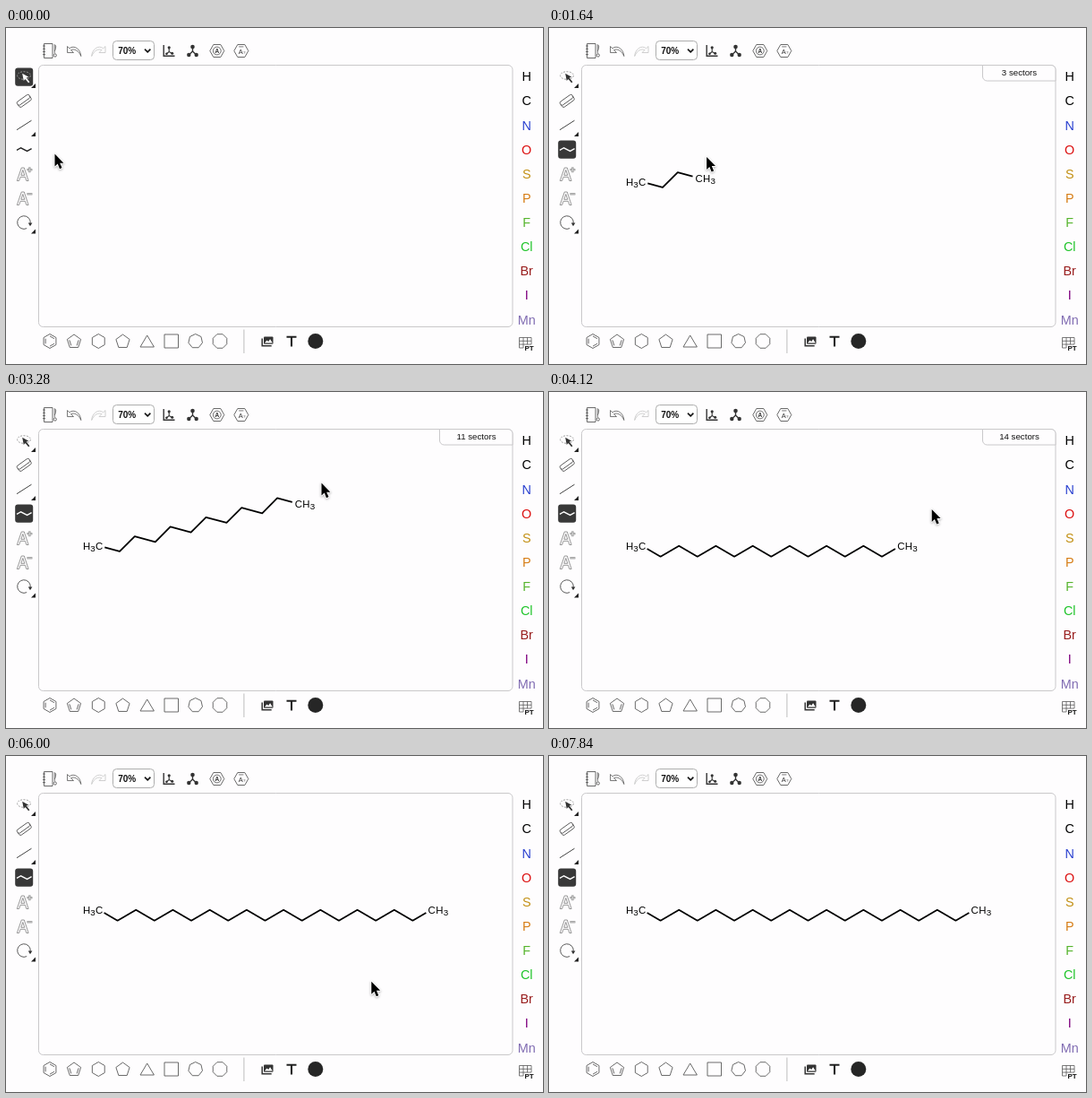
Animation of 600x375 px, one loop 7880 ms. Source, as an HTML page with a canvas:

```html
<!DOCTYPE html>
<html lang="en">
<head>
<meta charset="utf-8">
<title>Chain tool</title>
<style>
html, body { margin: 0; width: 100%; height: 100%; overflow: hidden; background: #fefdfe; }
canvas { display: block; width: 600px; height: 375px; }
</style>
</head>
<body>
<canvas id="stage"></canvas>
<script>
const W = 600, H = 375, LOOP = 7880, STEP = 40;
const BG = '#fefdfe', DARK = '#333', INK = '#5a5a5a', EDGE = '#c9c8ca';
const FONT = '"Liberation Sans", Arial, sans-serif';
const canvas = document.getElementById('stage');
const ctx = canvas.getContext('2d');
const dpr = window.devicePixelRatio || 1;
canvas.width = W * dpr;
canvas.height = H * dpr;

// ---- helpers ----
function stroke(d, color = INK, width = 0.9) {
  ctx.strokeStyle = color;
  ctx.lineWidth = width;
  ctx.stroke(new Path2D(d));
}
function fill(d, color = DARK) {
  ctx.fillStyle = color;
  ctx.fill(new Path2D(d));
}
function dot(x, y, r, color = DARK) {
  ctx.beginPath();
  ctx.arc(x, y, r, 0, Math.PI * 2);
  ctx.fillStyle = color;
  ctx.fill();
}
function ring(x, y, r, color = INK, width = 0.9) {
  ctx.beginPath();
  ctx.arc(x, y, r, 0, Math.PI * 2);
  ctx.strokeStyle = color;
  ctx.lineWidth = width;
  ctx.stroke();
}
function box(x, y, w, h, r, line, back) {
  ctx.beginPath();
  ctx.roundRect(x, y, w, h, r);
  if (back) { ctx.fillStyle = back; ctx.fill(); }
  if (line) { ctx.strokeStyle = line; ctx.lineWidth = 1; ctx.stroke(); }
}
function text(s, x, y, size, color = '#000', align = 'center', weight = '') {
  ctx.font = `${weight} ${size}px ${FONT}`;
  ctx.fillStyle = color;
  ctx.textAlign = align;
  ctx.fillText(s, x, y);
}
function at(x, y, draw) {
  ctx.save();
  ctx.translate(x, y);
  draw();
  ctx.restore();
}
function corners(n, r, turn = 0) {
  return Array.from({ length: n }, (_, i) => {
    const a = -Math.PI / 2 + turn + i * 2 * Math.PI / n;
    return [r * Math.cos(a), r * Math.sin(a)];
  });
}
function polygon(n, r, turn) {
  stroke('M' + corners(n, r, turn).map(p => p.join()).join('L') + 'Z');
}
function innerBonds(n, r, sides) {
  const p = corners(n, r);
  for (const i of sides) stroke(`M${p[i]}L${p[(i + 1) % n]}`);
}

// ---- toolbars ----
function topBar() {
  stroke('M42.5 17.5h9.5v16h-9.5zM41 20h3M41 23.2h3M41 26.4h3M41 29.6h3');
  stroke('M54.3 18.5q2.2 1 1.2 4.2l-1.2 3.3zM54.3 26v2.5', INK, 0.8);
  ring(54.8, 30.5, 1.6);
  const undo = 'M-7.5 -5.5v7h7l-3 -3C0 -3 5 -1.5 7.8 5.5C7.5 -2.5 0 -7.5 -5.2 -3.2z';
  at(76, 26, () => stroke(undo, INK, 0.8));
  at(103.5, 26, () => { ctx.scale(-1, 1); stroke(undo, '#c4c4c4', 0.8); });

  box(119.5, 14.5, 46, 21, 4, '#adadad', '#fff');
  text('70%', 125.2, 28.7, 10, '#111', 'left', 'bold');
  stroke('M155 23.6l3.2 3.2 3.2 -3.2', '#111', 1.6);

  stroke('M176.2 19v12.3h12.3', DARK, 1.4);
  stroke('M182.2 22v4.5l-3 2.5M182.2 26.5l3.5 2', DARK, 1.1);
  dot(182.2, 21.8, 1.6); dot(185.7, 28.2, 1.5); dot(179.4, 28.7, 1.3);
  stroke('M208.5 21v5l-4.2 4M208.5 26l4.2 4', DARK, 1.4);
  dot(208.5, 21, 2.3); dot(204.3, 30, 2.2); dot(212.7, 30, 2.2);

  const hex = 'M-8 0L-4 -7H4L8 0L4 7H-4Z';
  at(235.8, 25.5, () => {
    stroke(hex);
    ring(0, 0, 4.4);
    text('A', 0, 2.4, 6.5, DARK, 'center', 'bold');
  });
  at(262.8, 25.5, () => {
    stroke(hex);
    text('A', -0.5, 3, 7.5, DARK);
    stroke('M-2.6 -4.6h5.2', INK, 0.8);
    text('?', 3.6, 3.2, 4, DARK);
  });
}

function flyout(y) { fill(`M33 ${y - 5}v5h-5z`, '#222'); }

function letterIcon(y, sign) {
  const mark = 'M3.4 -4.2h6' + (sign > 0 ? 'M6.4 -7.2v6' : '');
  at(20, y, () => {
    stroke('M-7.7 8L-2.7 -6.5H0.3L5.1 8H2.8L1.4 3.8H-3.9L-5.4 8ZM-3.2 1.8L-1.2 -4L0.8 1.8Z', '#777', 0.75);
    stroke(mark, '#777', 2);
    stroke(mark, BG, 0.6);
  });
}

function leftBar(chainOn) {
  box(10.2, chainOn ? 125.5 : 44.5, 20, 20.3, 3, null, '#383838');

  ctx.setLineDash([2, 1.4]);
  ctx.beginPath();
  ctx.ellipse(20, 53, 7.4, 4.3, 0, 0, Math.PI * 2);
  ctx.strokeStyle = chainOn ? '#888' : '#aaa';
  ctx.lineWidth = 0.8;
  ctx.stroke();
  ctx.setLineDash([]);
  fill('M18.2 50.8l7.2 4 -2.7 .8 3.7 4.7 -1.3 1 -3.7 -4.6 -1.6 2.2z', chainOn ? '#333' : '#fff');
  flyout(67);

  // eraser
  at(20.3, 81.3, () => {
    ctx.rotate(-0.62);
    ctx.beginPath();
    ctx.roundRect(-8.3, -3.6, 16.6, 4.6, 2);
    ctx.strokeStyle = INK;
    ctx.lineWidth = 0.9;
    ctx.stroke();
    stroke('M-8.2 -1v2.8q0 2 2 2h12.2q2 0 2 -2v-2.8');
  });

  stroke('M12 113.7L28.5 103.2', '#444', 1);
  flyout(121);

  stroke('M12 136.4L16.6 133.8L23.6 137.4L28.6 134.6', chainOn ? '#fff' : '#222', 1.3);

  letterIcon(162.5, 1);
  letterIcon(189.5, -1);

  stroke('M23.2 223.6A7.3 7.3 0 1 1 27.2 218.2', INK, 1);
  fill('M24.8 217.6h4.6l-2.4 3.6z');
  flyout(229.5);
}

const ATOMS = [
  ['H', '#000'], ['C', '#000'], ['N', '#2a40d0'], ['O', '#dc1010'], ['S', '#c28f12'],
  ['P', '#d67c14'], ['F', '#55b42c'], ['Cl', '#1fc42a'], ['Br', '#981c1c'],
  ['I', '#800080'], ['Mn', '#806cb2']
];
function rightBar() {
  ATOMS.forEach(([name, color], i) => text(name, 581.7, 59.3 + i * 27.13, 14.4, color));
  stroke('M573.5 345.5h13.5v7.5M573.5 345.5v11.5h4.4M573.5 349.3h13.5M573.5 353.1h13.5' +
    'M578 345.5v11.5M582.5 345.5v7.6', INK, 0.8);
  text('PT', 584.6, 360.4, 8, '#111', 'center', 'bold');
}

function bottomBar() {
  const y = 349.5;
  at(49, y, () => { polygon(6, 8); innerBonds(6, 5.6, [0, 2, 4]); });
  at(76, y + 0.5, () => { polygon(5, 8); innerBonds(5, 5.4, [1, 3]); });
  at(103.3, y, () => polygon(6, 8));
  at(130.5, y + 0.5, () => polygon(5, 8));
  stroke('M150 356L157.7 343L165.4 356Z');
  stroke('M177 342h15.5v15h-15.5z');
  at(211.7, y, () => polygon(7, 8));
  at(239, y, () => polygon(8, 8.4, Math.PI / 8));
  stroke('M265.9 336.5V363', '#bdbdbd', 1);

  stroke('M286.2 346.5v8.2h10.5', DARK, 1.5);
  box(288, 344.5, 10.5, 8.2, 1, null, DARK);
  fill('M289 351.5l2.5 -3 1.6 1.6 2 -2.8 2.7 4.2z', '#fff');
  stroke('M313.5 344.8h11M319 344.8v10.7', '#222', 2.1);
  dot(345.8, 349.5, 8.5, '#262626');
}

// ---- motion ----
// time, x, y, eased arrival
const PATH = [
  [0, 54.5, 140.6], [40, 54.5, 140.6], [400, 21, 135, 1], [600, 21, 135], [1040, 104.5, 169.6, 1],
  [1200, 104.5, 169.6], [2240, 273.8, 108.8], [3280, 352.5, 101.6], [5000, 506.5, 161.6],
  [5280, 533, 169], [5560, 533, 169], [6320, 331, 303, 1], [6760, 292.5, 308.6, 1],
  [6880, 292.5, 308.6], [7120, 290, 333, 1]
];
const PICK = 600, PRESS = 1200, RELEASE = 5560, GONE = 7120;

function pointer(t) {
  const i = PATH.findIndex(k => k[0] > t);
  if (i < 0) return PATH[PATH.length - 1].slice(1, 3);
  const a = PATH[i - 1], b = PATH[i];
  let u = (t - a[0]) / (b[0] - a[0]);
  if (b[3]) u = u * u * (3 - 2 * u);
  return [a[1] + (b[1] - a[1]) * u, a[2] + (b[2] - a[2]) * u];
}

// ---- carbon chain ----
const START = [104, 171.8], BOND = 23.8, SNAP = Math.PI / 12;

function chainShape(t) {
  const [px, py] = pointer(Math.min(t, RELEASE));
  const dx = px - START[0], dy = py - START[1];
  return {
    count: Math.round(Math.hypot(dx, dy) / BOND),
    angle: Math.round(Math.atan2(dy, dx) / SNAP) * SNAP
  };
}

function toward(a, b, d) {
  const len = Math.hypot(b[0] - a[0], b[1] - a[1]);
  return [a[0] + (b[0] - a[0]) * d / len, a[1] + (b[1] - a[1]) * d / len];
}

function drawChain({ count, angle }) {
  const pts = [START];
  for (let i = 0; i < count; i++) {
    const a = angle + (i % 2 ? -1 : 1) * Math.PI / 6;
    const [x, y] = pts[i];
    pts.push([x + BOND * Math.cos(a), y + BOND * Math.sin(a)]);
  }
  const end = pts[count];
  const line = pts.slice();
  line[0] = toward(START, pts[1], 6.5);
  line[count] = toward(end, pts[count - 1], 6.5);
  ctx.lineJoin = 'round';
  stroke('M' + line.map(p => p.join()).join('L'), '#000', 1.8);

  const [sx, sy] = START, [ex, ey] = end;
  text('C', sx, sy + 4.2, 11.4);
  text('3', sx - 7.1, sy + 6.2, 9.8);
  text('H', sx - 14, sy + 4.2, 11.4);
  text('C', ex + 0.7, ey + 4.5, 11.4);
  text('H', ex + 9.3, ey + 4.5, 11.4);
  text('3', ex + 16.4, ey + 6.5, 9.8);
}

function drawCounter(count) {
  box(484.5, 41.5, 81.5, 17.5, [0, 5, 0, 5], EDGE, BG);
  text(count + ' sectors', 525.5, 53.4, 9.7, '#111');
}

function drawPointer(t) {
  const [x, y] = pointer(t);
  at(x, y, () => {
    const d = 'M0 0V14L3.2 11L5.5 16.6L8 15.5L5.7 10.1H9.9Z';
    ctx.lineJoin = 'round';
    ctx.save();
    ctx.shadowColor = 'rgba(0,0,0,.3)';
    ctx.shadowBlur = 2.5 * dpr;
    ctx.shadowOffsetY = dpr;
    stroke(d, '#fff', 1.8);
    ctx.restore();
    fill(d, '#000');
  });
}

function draw(t) {
  ctx.setTransform(dpr, 0, 0, dpr, 0, 0);
  ctx.lineJoin = 'miter';
  ctx.fillStyle = BG;
  ctx.fillRect(0, 0, W, H);
  box(36.5, 41.5, 529.5, 292, 5, EDGE);
  topBar();
  leftBar(t >= PICK);
  rightBar();
  bottomBar();
  if (t >= PRESS) {
    const chain = chainShape(t);
    if (chain.count > 0) {
      drawChain(chain);
      if (t < RELEASE) drawCounter(chain.count);
    }
  }
  if (t < GONE) drawPointer(t);
}

const began = performance.now();
function tick() {
  const t = (performance.now() - began) % LOOP;
  draw(Math.floor(t / STEP) * STEP);
  requestAnimationFrame(tick);
}
tick();
</script>
</body>
</html>
```
